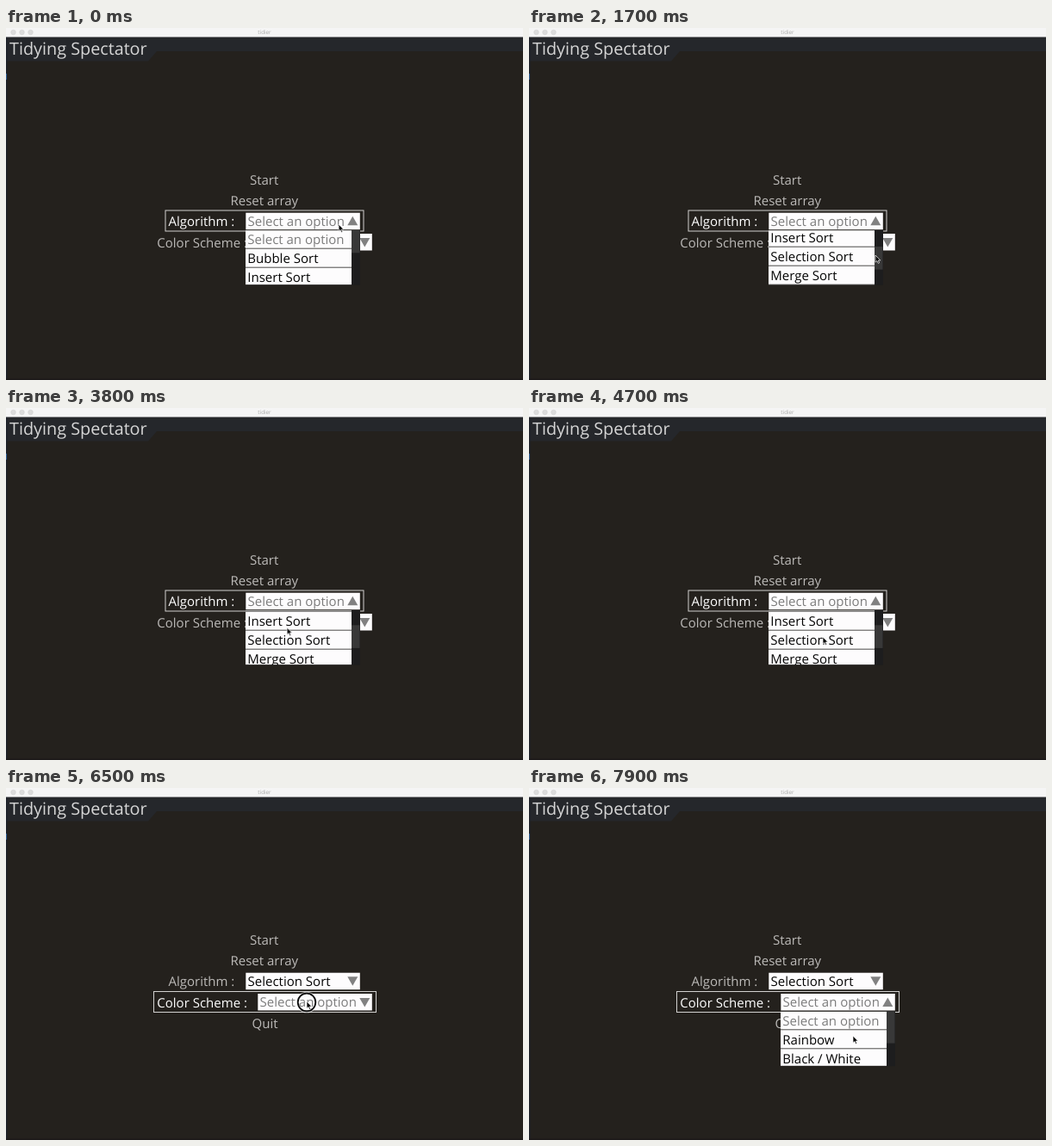
These frames come from a looping animation (600x409 px, 8 s). An HTML page:

```html
<!DOCTYPE html>
<html lang="en">
<head>
<meta charset="utf-8">
<title>Menu</title>
<style>
  html, body { margin: 0; width: 100%; height: 100%; overflow: hidden; background: #24211d; }
  #stage { display: block; width: 600px; height: 409px; font: 15px "Open Sans", "Noto Sans", sans-serif; text-rendering: geometricPrecision; }
  .label { fill: #bcbab8; }
  .lit { fill: #fff; }
  .hint { fill: #7c7c7c; }
  .option { fill: #050505; }
  .box { fill: #fdfcfd; }
  .arrow { fill: #818181; }
  .frame { fill: none; stroke: #d2d1d0; }

  /* Menu states: 8 s loop, hard switches */
  .before-pick, .after-pick, .focus-1, .focus-2, .closed, .open, .scroll, .ring { animation: 8s step-end infinite; }
  .before-pick { animation-name: until-pick; }
  .after-pick { animation-name: from-pick; }
  .focus-1 { animation-name: until-focus; }
  .focus-2 { animation-name: from-focus; }
  .closed { animation-name: until-open; }
  .open { animation-name: from-open; }
  .scroll { --s: 0; animation-name: scroll; }
  .ring { animation-name: press; }
  .rows { transform: translateY(calc(var(--s, 0) * -1px)); }
  .thumb { transform: translateY(calc(var(--s, 0) * .42px)); }
  .cursor { animation: move 8s linear infinite; }

  @keyframes until-pick { 0% { opacity: 1 } 62.5%, 100% { opacity: 0 } }
  @keyframes from-pick { 0% { opacity: 0 } 62.5%, 100% { opacity: 1 } }
  @keyframes until-focus { 0% { opacity: 1 } 80%, 100% { opacity: 0 } }
  @keyframes from-focus { 0% { opacity: 0 } 80%, 100% { opacity: 1 } }
  @keyframes until-open { 0% { opacity: 1 } 83.75%, 100% { opacity: 0 } }
  @keyframes from-open { 0% { opacity: 0 } 83.75%, 100% { opacity: 1 } }
  @keyframes scroll { 0% { --s: 0 } 20% { --s: 46 } 32.5% { --s: 88 } 41.25%, 100% { --s: 42 } }
  @keyframes press {
    0% { opacity: 0 } 15% { opacity: 1 } 17.5% { opacity: 0 }
    55% { opacity: 1 } 58.75% { opacity: 0 }
    80% { opacity: 1 } 83.75%, 100% { opacity: 0 }
  }
  @keyframes move {
    0% { transform: translate(386px, 228px) }
    11.25%, 12.5% { transform: translate(410px, 260px) }
    15% { transform: translate(403px, 255px) }
    17.5%, 18.75% { transform: translate(402px, 268px) }
    20%, 22.5% { transform: translate(402px, 264px) }
    28.75%, 33.75% { transform: translate(385px, 287px) }
    35%, 36.25% { transform: translate(385px, 272px) }
    38.75% { transform: translate(353px, 267px) }
    42.5%, 46.25% { transform: translate(347px, 267px) }
    50% { transform: translate(285px, 232px) }
    52.5%, 68% { transform: translate(341px, 266px) }
    78.75%, 83.75% { transform: translate(349px, 248px) }
    88.75% { transform: translate(366px, 297px) }
    93.75%, 96.25% { transform: translate(337px, 232px) }
    98.75%, 100% { transform: translate(376px, 288px) }
  }
</style>
</head>
<body>
<svg id="stage" viewBox="0 0 600 409">
  <rect width="600" height="409" fill="#24211d"/>

  <!-- Window and title -->
  <path d="M0 10H600V27H175L165 38.5H0Z" fill="#25272b"/>
  <path d="M0 10H1.5V409H0Z" fill="#1d2129"/>
  <path d="M0 53H1V60H0Z" fill="#2c5c93"/>
  <path d="M0 407.5H600V409H0Z" fill="#1c1919"/>
  <rect width="600" height="10.5" fill="#f5f5f5"/>
  <g fill="#dcdcdc" stroke="#cfcfcf" stroke-width=".5">
    <circle cx="8.5" cy="5" r="2.8"/><circle cx="18.5" cy="5" r="2.8"/><circle cx="28.5" cy="5" r="2.8"/>
  </g>
  <text x="300" y="7.3" font-size="6.3" text-anchor="middle" fill="#a9a9a9">tidier</text>
  <text x="4" y="31.3" font-size="19.8" fill="#d6d6d6">Tidying Spectator</text>

  <!-- Menu -->
  <g class="label">
    <text x="283" y="181.5">Start</text>
    <text x="260.5" y="206">Reset array</text>
    <text x="285.5" y="279">Quit</text>
  </g>
  <g class="focus-1">
    <rect class="frame" x="185" y="212" width="230" height="24"/>
    <text class="lit" x="188.5" y="230">Algorithm :</text>
    <text class="label" x="175.3" y="254.7">Color Scheme :</text>
  </g>
  <g class="focus-2">
    <rect class="frame" x="171.5" y="236.5" width="258" height="24"/>
    <text class="label" x="188.5" y="230">Algorithm :</text>
    <text class="lit" x="175.3" y="254.7">Color Scheme :</text>
  </g>
  <g id="selects"></g>

  <g class="cursor">
    <g class="ring" fill="none">
      <circle cy="1" r="11" stroke="#fff" stroke-opacity=".6" stroke-width="2.6"/>
      <circle cy="1" r="10.3" stroke="#0a0a0a" stroke-width="1.8"/>
    </g>
    <path d="M0 0V8.2L1.9 6.5L3.2 9.4L4.6 8.8L3.3 6H5.8Z" fill="#050505" stroke="#fff" stroke-width=".7"/>
  </g>
</svg>

<script>
  const ROW = 22, VIEW = 64;

  const arrow = (x, y, up) =>
    `<path class="arrow" d="${up ? `M${x - 6} ${y + 5}h12l-6 -10.5z` : `M${x - 6} ${y - 5}h12l-6 10.5z`}"/>`;

  const box = (x, y) => `<rect class="box" x="${x}" y="${y}" width="132.5" height="19.5"/>`;

  const value = (x, y, text, hint) =>
    `<text class="${hint ? 'hint' : 'option'}" x="${x + 2.3}" y="${y + 15.3}">${text}</text>`;

  function list(x, y, names, total) {
    const rows = names.map((name, i) => `
      <text class="${i ? 'option' : 'hint'}" x="2.3" y="${i * ROW + 16.3}">${name}</text>
      <path d="M0 ${i * ROW + 21.5}H123" stroke="#4c4b49"/>`).join('');
    const thumb = VIEW * VIEW / (total * ROW);
    return `
      <svg x="${x}" y="${y}" width="133" height="${VIEW}">
        <rect width="133" height="${VIEW}" fill="#1b1b1c"/>
        <rect class="box" y=".5" width="123" height="${VIEW - 1}"/>
        <g class="rows">${rows}</g>
        <rect x="123" width="10" height="${VIEW}" fill="#1d1d1e"/>
        <rect class="thumb" x="123" width="9.5" height="${thumb}" fill="#383838"/>
      </svg>`;
  }

  const algorithms = ['Select an option', 'Bubble Sort', 'Insert Sort', 'Selection Sort', 'Merge Sort', 'Quick Sort', 'Heap Sort'];
  const schemes = ['Select an option', 'Rainbow', 'Black / White'];

  document.getElementById('selects').innerHTML = `
    ${box(292.3, 239)}${value(292.3, 239, schemes[0], true)}
    <g class="closed">${arrow(416.3, 249, false)}</g>
    <g class="open">${arrow(416.3, 249, true)}${list(292, 259.3, schemes, 5)}</g>
    ${box(278.3, 214.7)}
    <g class="before-pick">
      ${value(278.3, 214.7, algorithms[0], true)}${arrow(402.3, 224.3, true)}
      <g class="scroll">${list(278, 234.7, algorithms, 7)}</g>
    </g>
    <g class="after-pick">${value(278.3, 214.7, algorithms[3])}${arrow(402.3, 224.3, false)}</g>`;
</script>
</body>
</html>
```
